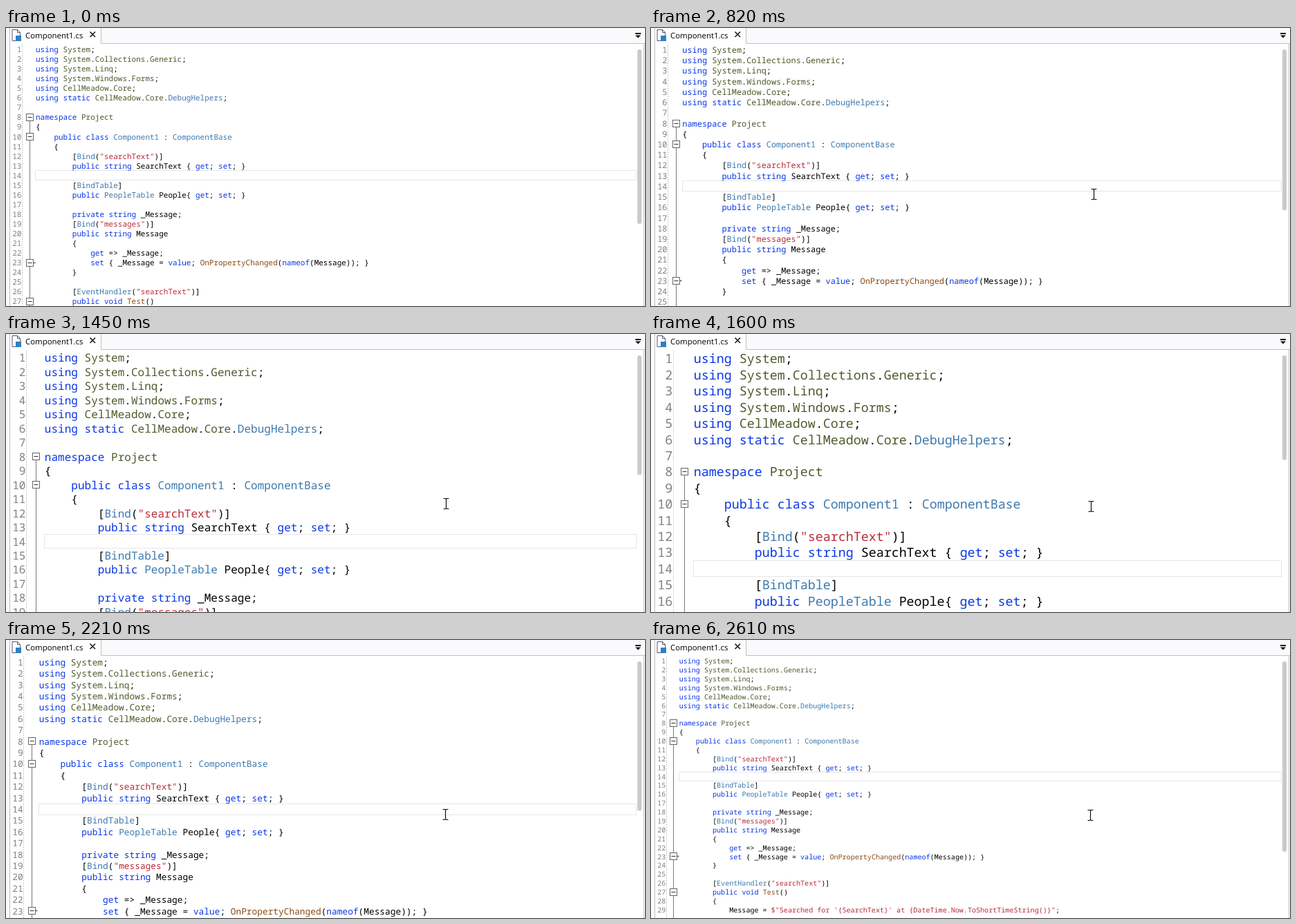
Write an HTML page that moves like this. It is 924 by 403 pixels and loops after 3.77 s.

```html
<!DOCTYPE html>
<html lang="en">
<head>
<meta charset="utf-8">
<title>Editor zoom</title>
<style>
html, body { margin: 0; width: 100%; height: 100%; overflow: hidden; background: #fff; }
svg { display: block; width: 924px; height: 403px; }
#code text, #nums text { font-family: "Noto Sans Mono", monospace; font-weight: 500; white-space: pre; text-rendering: geometricPrecision; }
#nums { fill: #808080; text-anchor: end; }
.k { fill: #0a36e6; }
.n { fill: #4b5c2c; }
.t { fill: #3d79ae; }
.m { fill: #8a4a12; }
.s { fill: #b92b3a; }
.tab { font: 11.4px "Open Sans", sans-serif; text-rendering: geometricPrecision; }
</style>
</head>
<body>
<svg viewBox="0 0 924 403">
  <rect width="924" height="403" fill="#fff"/>
  <rect id="current" fill="none" stroke="#e6e6e6"/>
  <path id="gutter" stroke="#a0a0a0" stroke-dasharray="1 2"/>
  <g id="nums"></g>
  <g id="code"></g>
  <path id="foldLine" fill="none" stroke="#777"/>
  <g id="folds"></g>
  <rect id="thumb" x="913" y="31" width="6" rx="3" fill="#cacaca"/>

  <rect width="924" height="22" fill="#faf9fb"/>
  <rect y="22" width="5" height="381" fill="#faf9fb"/>
  <rect x="6" width="131" height="23" fill="#fff"/>
  <path d="M5.5 0V403M137.5 0V22.5H924M922.5 23V403" fill="none" stroke="#bfbfc4"/>
  <path d="M9 2.5H16.5L20.5 6.5V18.5H9Z" fill="#fff" stroke="#4a5a78"/>
  <path d="M16.5 2.5V6.5H20.5" fill="none" stroke="#4a5a78"/>
  <rect x="14" y="11" width="8" height="8" fill="#2f7fc4"/>
  <text class="tab" x="28" y="15">Component1.cs</text>
  <path d="M121.5 5.5L129 13M129 5.5L121.5 13" stroke="#111" stroke-width="1.5"/>
  <path d="M910 7H918V9H910ZM910 10.5H918L914 14.5Z" fill="#111"/>
  <path id="beam" d="M-4 -7.5H-1L0 -6.5L1 -7.5H4M0 -6.5V6.5M-4 7.5H-1L0 6.5L1 7.5H4" fill="none" stroke="#111" stroke-width="1.2"/>
</svg>
<script>
const LOOP = 3770, TOP = 24, CURRENT = 14, FOLDS = [8, 10, 23, 27];

// [time, font size]
const ZOOM = [
  [0, 12], [820, 13], [900, 14],
  [1130, 14.5], [1210, 16], [1280, 17],
  [1450, 17.5], [1530, 19], [1600, 20],
  [1830, 18.5], [1910, 17],
  [2140, 15.5], [2210, 14],
  [2530, 12.5], [2610, 11]
];

// [time, x, y]
const POINTER = [
  [70, 763, 308], [150, 718, 281], [230, 680, 260], [300, 651, 246],
  [380, 634, 238], [450, 637, 239], [530, 643, 242],
  [820, 640, 241], [900, 636, 241], [1450, 636, 246], [1530, 636, 249],
  [1600, 636, 250], [2140, 636, 252], [2210, 635, 253], [2530, 635, 254]
];

const SOURCE = `using System;
using System.Collections.Generic;
using System.Linq;
using System.Windows.Forms;
using CellMeadow.Core;
using static CellMeadow.Core.DebugHelpers;

namespace Project
{
    public class Component1 : ComponentBase
    {
        [Bind("searchText")]
        public string SearchText { get; set; }

        [BindTable]
        public PeopleTable People{ get; set; }

        private string _Message;
        [Bind("messages")]
        public string Message
        {
            get => _Message;
            set { _Message = value; OnPropertyChanged(nameof(Message)); }
        }

        [EventHandler("searchText")]
        public void Test()
        {
            Message = $"Searched for '{SearchText}' at {DateTime.Now.ToShortTimeString()}";`.split("\n");

const WORDS = {
  k: "using static namespace public private class string void get set value nameof",
  n: "System Collections Generic Linq Windows Forms CellMeadow Core Project",
  t: "DebugHelpers Component1 ComponentBase Bind BindTable PeopleTable EventHandler",
  m: "OnPropertyChanged Test"
};
const kinds = new Map();
for (const kind in WORDS) WORDS[kind].split(" ").forEach(w => kinds.set(w, kind));

const $ = id => document.getElementById(id);
const set = (el, attrs) => { for (const k in attrs) el.setAttribute(k, attrs[k]); };
const add = (parent, tag, text = "") => {
  const el = document.createElementNS("http://www.w3.org/2000/svg", tag);
  el.textContent = text;
  return parent.appendChild(el);
};

const rows = SOURCE.map((line, i) => {
  const code = add($("code"), "text");
  for (const token of line.match(/\$?"[^"]*"|\w+|[^\w"$]+/g) || []) {
    const kind = token.includes('"') ? "s" : kinds.get(token);
    set(add(code, "tspan", token), kind ? { class: kind } : {});
  }
  return { code, num: add($("nums"), "text", i + 1) };
});

const folds = FOLDS.map(line => {
  const g = add($("folds"), "g");
  set(add(g, "rect"), { x: -5, y: -5, width: 10, height: 10, fill: "#fff", stroke: "#666" });
  set(add(g, "path"), { d: "M-3 0H3" + (line === 23 ? "M5 0H8" : ""), stroke: "#333" });
  return g;
});

const snap = v => Math.floor(v) + 0.5;

function layout(size) {
  const lineHeight = size * 1.171;
  const textX = 14.9 + 2.34 * size;
  const numRight = 9.2 + 1.1 * size;
  const foldX = snap(34.4 + 1.72 * (size - 12));
  const lineTop = n => TOP + (n - 1) * lineHeight;
  const foldY = n => snap(lineTop(n) + lineHeight / 2);
  const fontSize = size * 0.55 / 0.6;

  set($("code"), { "font-size": fontSize });
  set($("nums"), { "font-size": fontSize });
  rows.forEach(({ code, num }, i) => {
    const y = Math.round(lineTop(i + 1) + 0.92 * size);
    set(code, { x: textX, y });
    set(num, { x: numRight, y });
  });

  const x = snap(textX), y = snap(lineTop(CURRENT));
  set($("current"), { x, y, width: 911.5 - x, height: Math.round(lineHeight) });
  set($("gutter"), { d: `M${snap(numRight + 1.3)} ${TOP}V403` });
  set($("foldLine"), { d: `M${foldX} ${foldY(8)}V403` });
  folds.forEach((g, i) => set(g, { transform: `translate(${foldX} ${foldY(FOLDS[i])})` }));
  set($("thumb"), { height: 3035 / size });
}

const stepAt = (table, t) => table.filter(row => row[0] <= t).pop();

let shown;
function draw(now) {
  const t = now % LOOP;
  const size = stepAt(ZOOM, t)[1];
  if (size !== shown) layout(shown = size);
  const at = stepAt(POINTER, t);
  set($("beam"), at
    ? { visibility: "visible", transform: `translate(${at[1] + 0.5} ${at[2]})` }
    : { visibility: "hidden" });
}

const start = performance.now();
function tick() {
  draw(performance.now() - start);
  requestAnimationFrame(tick);
}
tick();
</script>
</body>
</html>
```
